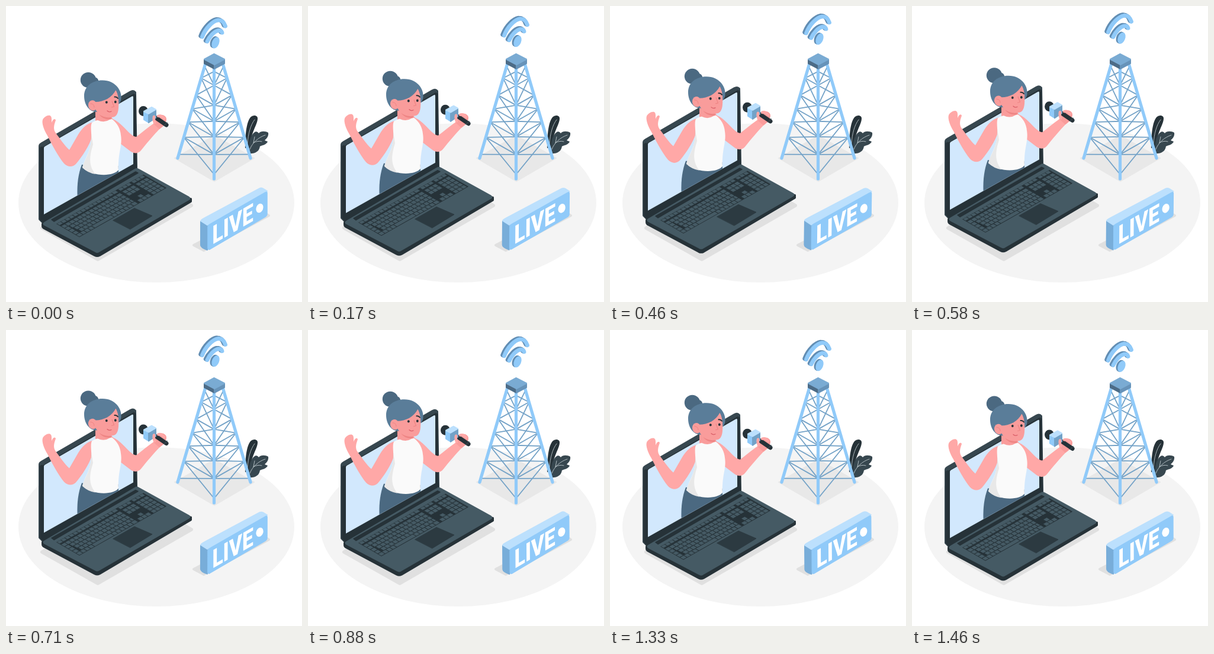
Recreate the animation shown at these times as an HTML page with a canvas. Size 500 by 500 pixels, loop 1500 ms.

```html
<!DOCTYPE html>
<html lang="en">
<head>
<meta charset="utf-8">
<title>Live broadcast</title>
<style>
  html, body { margin: 0; width: 100%; height: 100%; overflow: hidden; background: #fff; }
  canvas { display: block; width: 100vw; height: 100vh; }
</style>
</head>
<body>
<canvas id="stage"></canvas>
<script>
const LOOP = 1500, SIZE = 500;
const C = {
  ground: '#f4f4f4', shadow: '#e0e0e0', ink: '#263238', slate: '#455a64', mid: '#37474f',
  blue: '#90caf9', pale: '#bce0fd', steel: '#73a2c7', deep: '#4d6c87',
  skin: '#ffa8a7', face: '#f99c9b', blush: '#ee8584', hair: '#5a7d99', jeans: '#4b6981'
};
const canvas = document.getElementById('stage');
const ctx = canvas.getContext('2d');

// Fills a path; a round value softens its corners with a matching outline.
function fill(d, color, round = 0) {
  const path = new Path2D(d);
  ctx.fillStyle = color;
  ctx.fill(path);
  if (round) stroke(path, color, round);
}

function stroke(d, color, width) {
  ctx.strokeStyle = color;
  ctx.lineWidth = width;
  ctx.lineCap = ctx.lineJoin = 'round';
  ctx.stroke(d instanceof Path2D ? d : new Path2D(d));
}

function oval(x, y, rx, ry, color, turn = 0) {
  ctx.beginPath();
  ctx.ellipse(x, y, rx, ry, turn, 0, Math.PI * 2);
  ctx.fillStyle = color;
  ctx.fill();
}

function group(draw) {
  ctx.save();
  draw();
  ctx.restore();
}

function drawGround() {
  oval(254, 332.5, 233, 134.5, C.ground);
  fill('M61 375 L221 284 L313 337 L155 428Z', C.shadow, 6);
  fill('M285 257 L352 219 L419 257 L352 296Z', '#e8e8e8', 2);
  fill('M317 404 L429 345 L444 354 L334 413Z', C.shadow, 4);
}

function drawPlant() {
  fill('M404 240 C404 214 407 193 414 187 C419 183 426 185 425 191 C424 202 415 210 411 240Z', C.ink);
  fill('M410 249 C411 238 410 227 414 221 C418 213 422 211 425 213 L427 215 C430 211 438 211 443 214 C444 220 440 224 437 227 L442 229 C440 234 434 235 429 237 C428 246 420 250 410 249Z', C.mid);
  stroke('M408 232 C409 216 413 201 420 192 M412 242 C416 231 426 222 438 218 M418 231 L420 221 M418 231 Q425 227 432 229', '#cfd8dc', .8);
}

function drawTower() {
  const legs = {
    left: [337, 97, 290, 257], right: [366, 97, 413, 257], front: [351.5, 105, 351.5, 292]
  };
  const levels = [.03, .155, .335, .48, .62, .78, .96];
  const at = ([x0, y0, x1, y1], k) => [x0 + (x1 - x0) * k, y0 + (y1 - y0) * k];
  const line = (a, b, color, width) => stroke(`M${a} L${b}`, color, width);

  for (const side of [legs.left, legs.right]) {
    levels.slice(1).forEach((k, i) => {
      const above = levels[i];
      line(at(side, above), at(legs.front, k), C.steel, 1.8);
      line(at(side, k), at(legs.front, above), C.steel, 1.8);
      if (k < .9) line(at(side, k), at(legs.front, k), C.steel, 1.8);
    });
  }
  for (const leg of Object.values(legs)) line(at(leg, 0), at(leg, 1), C.blue, 5.2);

  fill('M335 91 L352 100 L352 106 L335 97Z', C.deep, 2);
  fill('M352 100 L369 91 L369 97 L352 106Z', '#6793b9', 2);
  fill('M335 90 L351.5 81 L369 90 L352 99Z', '#7aabd3', 2);
}

function drawSignal() {
  const side = '#628eb4';
  const arcs = [
    'M331.5 52 C337 37 350 25 358 24 C365 23.5 368 27 370.5 34',
    'M340 60 C344 51 352 43 358 41.5 C362 41 364 42 365 45'
  ];
  for (const d of arcs) {
    for (let k = 4; k >= 0; k--) {
      group(() => {
        ctx.translate(-k * .7, -k * .4);
        stroke(d, k ? side : C.blue, 6.8);
      });
    }
  }
  for (let k = 4; k >= 0; k--) {
    oval(354 - k * .7, 62 - k * .3, 6, 10, k ? side : C.blue, .38);
  }
}

function drawSign(angle) {
  ctx.translate(385, 359.5);
  ctx.rotate(angle);
  ctx.translate(-385, -359.5);
  fill('M329 364 L340 370 L340 412 Q329 408 329 404Z', '#78add9', 2);
  fill('M329 363 Q330 361 334 359 L428 308.3 Q431 306.8 434 308.3 L441 312.6 L340 370Z', C.pale, 2);
  fill('M341 373 Q341 370.5 344 369 L438 315 Q441 313 441 316 L441 351 Q441 354 438 356 L344 411 Q341 412 341 408Z', C.blue, 1.5);
  group(() => {
    ctx.transform(.78, -.45, 0, 1, 348.5, 403);
    ctx.fillStyle = '#fff';
    ctx.font = '800 43px Roboto, sans-serif';
    ctx.fillText('LIVE', 0, 0);
  });
  oval(428.5, 341.5, 5.8, 8, '#fff', .35);
}

function drawKeyboard() {
  const pitch = 7.6, depth = 7.3, gap = 1.2;
  const clusters = [[1, 15], [120, 3], [146, 3]];
  ctx.transform(.866, -.49, .866, .5, 85, 368);
  ctx.fillStyle = C.ink;
  ctx.fillRect(0, 0, 170, 45);
  ctx.fillStyle = C.slate;
  for (let row = 0; row < 6; row++) {
    clusters.forEach(([start, count], c) => {
      for (let i = 0; i < count; i++) {
        const arrowGap = c === 1 && (row === 3 || (row === 4 && i !== 1));
        const spaceBar = c === 0 && row === 5 && i >= 4 && i <= 8;
        if (arrowGap || (spaceBar && i > 4)) continue;
        const shift = c === 0 && row > 1 && row < 5 && i ? 1.3 * (row - 1) : 0;
        const x = start + i * pitch + shift;
        const end = c === 0 && i === 14 ? 115 : x + pitch - gap;
        const width = spaceBar ? pitch * 5 - gap : end - x;
        ctx.fillRect(x, row * depth + (row ? 1.4 : .4), width, depth - gap - (row ? 0 : 1));
      }
    });
  }
}

function drawLaptop() {
  fill('M57 237 Q57 234 60 232.5 L210 145.5 Q215 142.5 218 146 L220 275 L63 366 L57 360Z', C.mid, 4);
  fill('M58 240 Q59 238 63 239 L215 150 Q218 149 218 152 L220 275 L63 366 L58 360Z', C.ink, 2.5);
  fill('M64 240 Q64 238 66 237 L212 153 Q215 151 215 154 L215 267 L64 352Z', '#d2e8fd');

  fill('M62 368 L154 417 L312 326 L312 330 L158 421 Q154 423 150 421 L64 375 Q62 374 62 371Z', C.ink, 4);
  fill('M65 366 L218 276 Q221 274 224 276 L309 323 Q312 325 309 327 L157 415 Q154 417 151 415 L65 370 Q62 368 65 366Z', C.slate, 2);
  fill('M77 361 L219 280 L223 282 L81 364Z', C.ink, 1.5);
  group(drawKeyboard);
  fill('M181 362 L217 341.5 L247 354.5 L210 377Z', '#2c3a41', 1);
}

function drawBody() {
  fill('M128 268 C122 284 120 300 120.5 320 L190 281 L190 270Z', C.jeans);
  fill('M147 196 C136 199 129 206 122 217 L107 243 C99 236 91 224 83 213 C79 206 82 199 84 193 C83 189 79 191 77 197 C77 193 78 186 74 185 C70 184 64 188 62 192 C60 198 64 209 70 219 C78 235 88 254 98 266 C104 272 112 273 118 267 C129 254 140 237 146 220Z', C.skin);
  fill('M177 190 C188 192 199 205 207 213 C212 218 217 221 220 221 C229 214 240 205 250 198 L261 206 C249 218 237 233 228 244 C224 249 217 250 211 246 L190 230Z', C.skin);
  fill('M151 171 L151 194 Q166 203 182 194 L178 187 L178 178Z', C.face);
  fill('M157 183 Q167 190 178 188 L177 191 Q165 193 157 183Z', C.blush);
  fill('M145 197 Q152 193 155 193 Q166 198 175 192 L179 191 C188 198 193 207 194 218 C197 237 189 246 190 277 C182 288 147 289 129 273 C134 255 143 246 144 225 C145 214 142 204 145 197Z', '#fafafa');
  fill('M144 215 C145 246 134 255 129 273 Q138 282 151 284 C137 267 143 248 147 234Z', '#e8e8e8');
}

function drawHead() {
  oval(139, 125, 13.2, 13, C.jeans);
  oval(152.5, 126, 3.5, 5.5, C.jeans, -.4);
  fill('M163 125.5 C184 125.5 196 142 194.5 156 C194 162 191 166 189 166 L153 179 C141 179 132 167 132 152 C132 136 145 125.5 163 125.5Z', C.hair);
  fill('M151 162 C165 162 179 155 185.5 142 C190 148 191 160 190 173 C189 184 185 188 178 188 C165 188 154 182 151 174Z', C.face);
  fill('M184 140 C188 145 191 155 190.5 165 C195 160 196 151 190 142Z', C.hair);
  oval(146.5, 168, 7.5, 8.8, C.face, -.25);
  stroke('M143 165 Q149 165 149 171', C.blush, 1);
  oval(169.8, 162.6, 1.9, 2.2, C.ink);
  oval(184.8, 162, 1.9, 2.2, C.ink);
  stroke('M183.5 153.5 Q187 153 189 156', C.ink, 2);
  stroke('M179 161 L182.5 170 L178.5 171', C.blush, 1.2);
  stroke('M171 177 Q174 180 178 178', '#d95f68', 1.2);
}

function drawMicrophone() {
  fill('M249 199 C250 190 255 184 260 184 C266 183 271 187 271 191 C271 199 265 204 259 208Z', C.face);
  oval(232, 177.5, 8, 8.5, C.ink);
  stroke('M246 184 L271 201', C.ink, 7);
  stroke('M267 202 L272 197', C.mid, 1.5);
  fill('M233 179 L241 183 L241 197 L233 192Z', C.blue, 2);
  fill('M241 183 L253 176 L253 189 L241 197Z', C.steel, 2);
  fill('M233 178 L246 171 L253 175 L241 182Z', C.pale, 2);
  stroke('M251 197 Q249 191 250 187', C.skin, 4.5);
  stroke('M257 186 Q262 184 267 190', C.skin, 4.5);
}

function render() {
  const phase = (performance.now() % LOOP) / LOOP;
  const lift = -10 * (1 - Math.abs(2 * phase - 1));
  // Triangle wave: one degree each way, peaking at a quarter and three quarters.
  const sway = phase < .25 ? 4 * phase : phase < .75 ? 2 - 4 * phase : 4 * phase - 4;

  const wide = Math.round(innerWidth * devicePixelRatio) || SIZE;
  const tall = Math.round(innerHeight * devicePixelRatio) || SIZE;
  if (canvas.width !== wide || canvas.height !== tall) {
    canvas.width = wide;
    canvas.height = tall;
  }
  ctx.setTransform(wide / SIZE, 0, 0, tall / SIZE, 0, 0);
  ctx.fillStyle = '#fff';
  ctx.fillRect(0, 0, SIZE, SIZE);

  drawGround();
  drawPlant();
  drawTower();
  group(() => drawSign(sway * Math.PI / 180));
  group(() => {
    ctx.translate(0, lift);
    drawSignal();
    drawLaptop();
    drawBody();
    drawHead();
    drawMicrophone();
  });
  requestAnimationFrame(render);
}

render();
</script>
</body>
</html>
```
